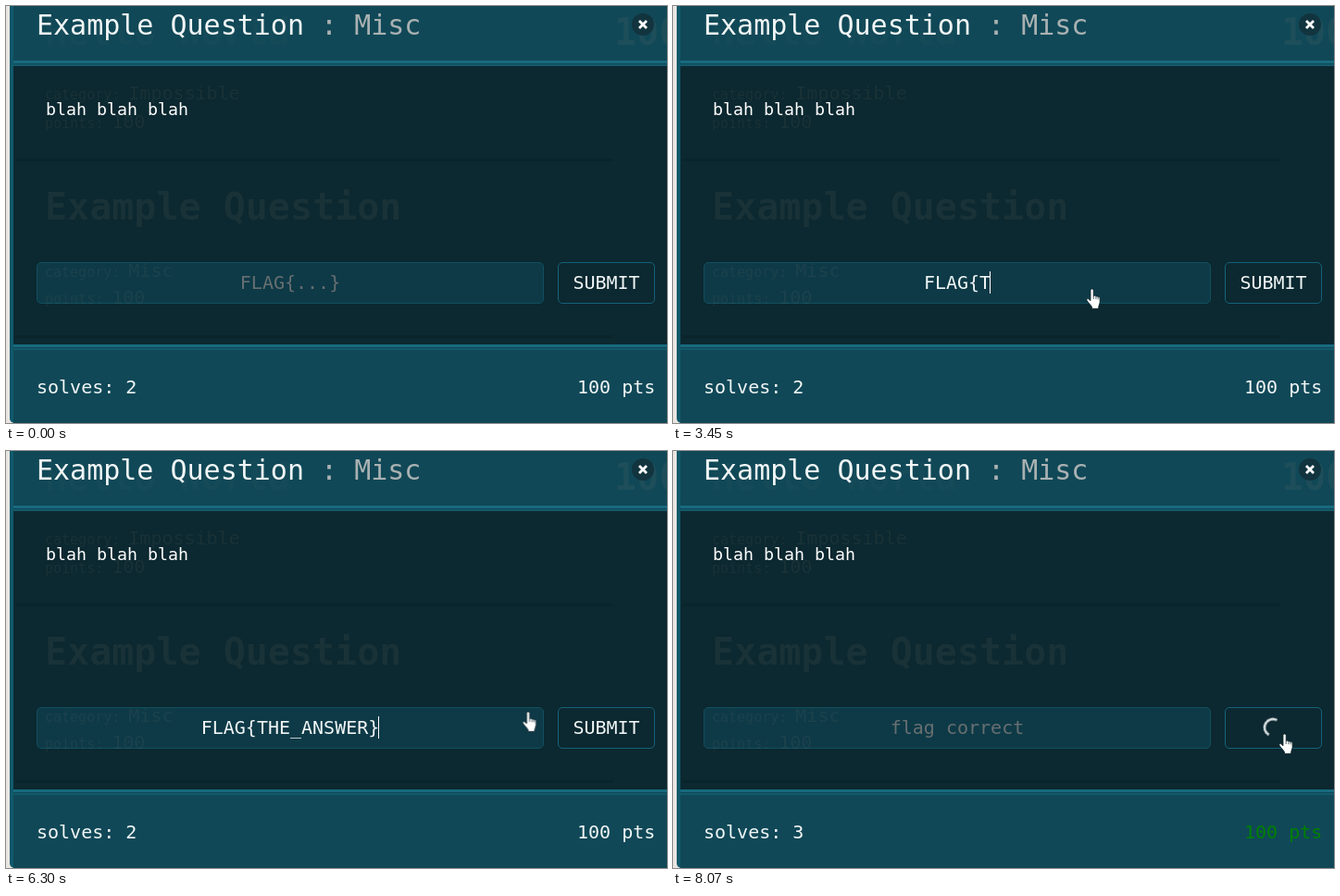
An HTML page that plays this animation: 714 by 451 pixels, repeating every 8.1 s.

```html
<!DOCTYPE html>
<html lang="en">
<head>
<meta charset="utf-8">
<title>Flag form</title>
<style>
  html, body { margin: 0; width: 100%; height: 100%; overflow: hidden; background: #0c2830; }
  #stage {
    --loop: 8100ms;
    position: relative; width: 714px; height: 451px; overflow: hidden;
    background: #e9e6e2; color: #f1f6f6;
    font: 20px/24px "DejaVu Sans Mono", monospace; white-space: pre;
  }
  #stage * { position: absolute; box-sizing: border-box; }
  #stage .flow { position: static; }

  /* dialog */
  .panel { left: 4px; top: -20px; width: 740px; height: 471px; background: #0c2830;
    border-left: 4px solid #10596b; border-radius: 0 0 0 5px; overflow: hidden; }
  .bar { left: 0; width: 740px; background: #104857; }
  .head { top: 0; height: 79px; }
  .foot { top: 392px; height: 79px; }
  .edge { left: 0; width: 740px; height: 6px;
    background: linear-gradient(#176a7e 3px, #0f4856 3px 4px, #135a6b 4px); }
  .title { left: 33px; top: 3px; font-size: 30px; line-height: 35px; }
  .title span { color: #a9b1b2; }
  .blah { left: 43px; top: 101px; font-size: 18.27px; line-height: 21px; color: #fff; }
  .close { left: 676px; top: 8px; }

  /* page showing faintly through the dialog */
  .ghost { left: 42px; color: rgba(120, 120, 118, .12); }
  .big { font-weight: bold; font-size: 40px; line-height: 46px; }
  .small { font-size: 15px; }
  .rule { left: 10px; width: 646px; height: 3px; background: rgba(4, 26, 32, .25); }

  /* form */
  .field, .button { top: 277px; height: 45px; border-radius: 5px; text-align: center; }
  .field { left: 33px; width: 548px; background: #0e3a47; border: 1px solid #114f5e; }
  .button { left: 596px; width: 105px; border: 1px solid #14627a;
    animation: hover var(--loop) infinite; }
  .line { left: -1px; right: -1px; top: 9px; }
  #hint { color: #676f71; }
  #caret { top: 9px; width: 1px; height: 24px; background: #fff; }
  .label { animation: label var(--loop) step-end infinite; }
  .spinner { left: 40px; top: 10px; opacity: 0; animation: label var(--loop) step-end infinite reverse; }
  .spinner { animation: busy var(--loop) step-end infinite; }
  .arc { transform-origin: 11px 11px; animation: spin 600ms 7140ms linear infinite; }

  .solves { left: 33px; top: 400px; }
  .points { left: 617px; top: 400px; }

  .hand { left: 446px; top: 305px; animation: move var(--loop) linear infinite; overflow: visible; }

  @keyframes hover {
    0%, 78.6% { background: transparent; border-color: #14627a; }
    80.2%, 88.1% { background: #0e3a47; border-color: #114f5e; }
    88.7%, 100% { background: transparent; border-color: #14627a; }
  }
  @keyframes label { 0% { opacity: 1; } 88.148%, 100% { opacity: 0; } }
  @keyframes busy { 0% { opacity: 0; } 88.148%, 100% { opacity: 1; } }
  @keyframes move {
    0%, 9.13% { transform: translate(57px, 148px); }
    9.14% { transform: translate(57px, 134px); }
    10.5% { transform: translate(46px, 92px); }
    12% { transform: translate(26px, 44px); }
    13.6% { transform: translate(8px, 10px); }
    15.43%, 17.16% { transform: translate(-1px, -2px); }
    19.6%, 75.8% { transform: none; }
    76.5% { transform: translate(32px, -9px); }
    77.2% { transform: translate(77px, -19px); }
    77.78% { transform: translate(111px, -24px); }
    78.6% { transform: translate(146px, -21px); }
    79.9% { transform: translate(182px, -10px); }
    81% { transform: translate(201px, -3px); }
    82.2%, 100% { transform: translate(208px, 0); }
  }
  @keyframes spin { to { transform: rotate(360deg); } }
</style>
</head>
<body>
<div id="stage">
  <div class="panel">
    <div class="bar head"></div><div class="edge" style="top:79px"></div>
    <div class="bar foot"></div><div class="edge" style="top:386px"></div>
  </div>
  <div class="rule" style="top:165px"></div>
  <div class="rule" style="top:356px"></div>

  <div class="field">
    <div class="line" id="hint"></div>
    <div class="line" id="typed"></div>
    <div id="caret"></div>
  </div>
  <div class="button">
    <div class="line label">SUBMIT</div>
    <svg class="spinner" width="22" height="22">
      <path class="arc" d="M12.6 2.1A9 9 0 0 1 9.4 19.9" fill="none" stroke="#d5dcdd" stroke-width="2.6"/>
    </svg>
  </div>

  <div class="ghost big" style="top:5px;opacity:.4">Hello World</div>
  <div class="ghost big" style="top:5px;left:657px">100</div>
  <div class="ghost" style="top:82px"><span class="flow small">category: </span>Impossible</div>
  <div class="ghost" style="top:113px"><span class="flow small">points: </span>100</div>
  <div class="ghost big" style="top:194px">Example Question</div>
  <div class="ghost" style="top:274px"><span class="flow small">category: </span>Misc</div>
  <div class="ghost" style="top:303px"><span class="flow small">points: </span>100</div>

  <div class="title">Example Question<span class="flow"> : Misc</span></div>
  <svg class="close" width="24" height="24">
    <circle cx="12" cy="12" r="12" fill="#12343e"/>
    <path d="M8 8l8 8m0-8l-8 8" stroke="#fff" stroke-width="2.8"/>
  </svg>
  <div class="blah">blah blah blah</div>
  <div class="solves" id="solves"></div>
  <div class="points" id="points">100 pts</div>

  <svg class="hand" width="17" height="24">
    <path d="M5 2.5a1.6 1.6 0 0 1 3.2 0v6.3l.3-.1a1.4 1.4 0 0 1 2.4.6 1.3 1.3 0 0 1 2.2.6 1.2 1.2 0 0 1 2 1v4.6c0 2-1.4 3.2-1.4 5v1.8H6.5v-1.8C5.6 18.6 2 15.4 1 13.3c-.6-1.4.9-2.3 2.1-1.3L5 13.8z"
      fill="#fff" stroke="#0b2028" stroke-width=".8"/>
    <path d="M8.2 9v3m2.7-2.6v2.8m2.2-2.2v2.4" stroke="#0b2028" stroke-width=".7"/>
  </svg>
</div>
<script>
  const LOOP = 8100, FOCUS = 1590, CLICK = 7140, REPLY = 7440;
  const FLAG = "FLAG{THE_ANSWER}";
  const KEYS = [2460, 2600, 2760, 2890, 3040, 3450, 3560, 3670, 3780,
                4140, 4320, 4600, 4700, 4800, 4980, 5210];
  const CARET_OFF = [[2100, 2460], [5730, 6230], [6810, LOOP]];
  const $ = id => document.getElementById(id);

  function setText(id, text) {
    if ($(id).textContent !== text) $(id).textContent = text;
  }

  function draw(t) {
    const done = t >= REPLY;
    const count = done ? 0 : KEYS.filter(k => k <= t).length;
    const caretOn = t >= FOCUS && t < CLICK && !CARET_OFF.some(([a, b]) => t >= a && t < b);
    setText("typed", FLAG.slice(0, count));
    setText("hint", done ? "flag correct" : count ? "" : "FLAG{...}");
    setText("solves", "solves: " + (done ? 3 : 2));
    $("points").style.color = done ? "#008000" : "";
    $("caret").style.left = 273 + count * 6 - (count > 0) + "px";
    $("caret").style.opacity = caretOn ? 1 : 0;
  }

  let start;
  function tick(now) {
    start ??= now;
    const t = (now - start) % LOOP;
    draw(t);
    requestAnimationFrame(tick);
  }
  draw(0);
  requestAnimationFrame(tick);
</script>
</body>
</html>
```
